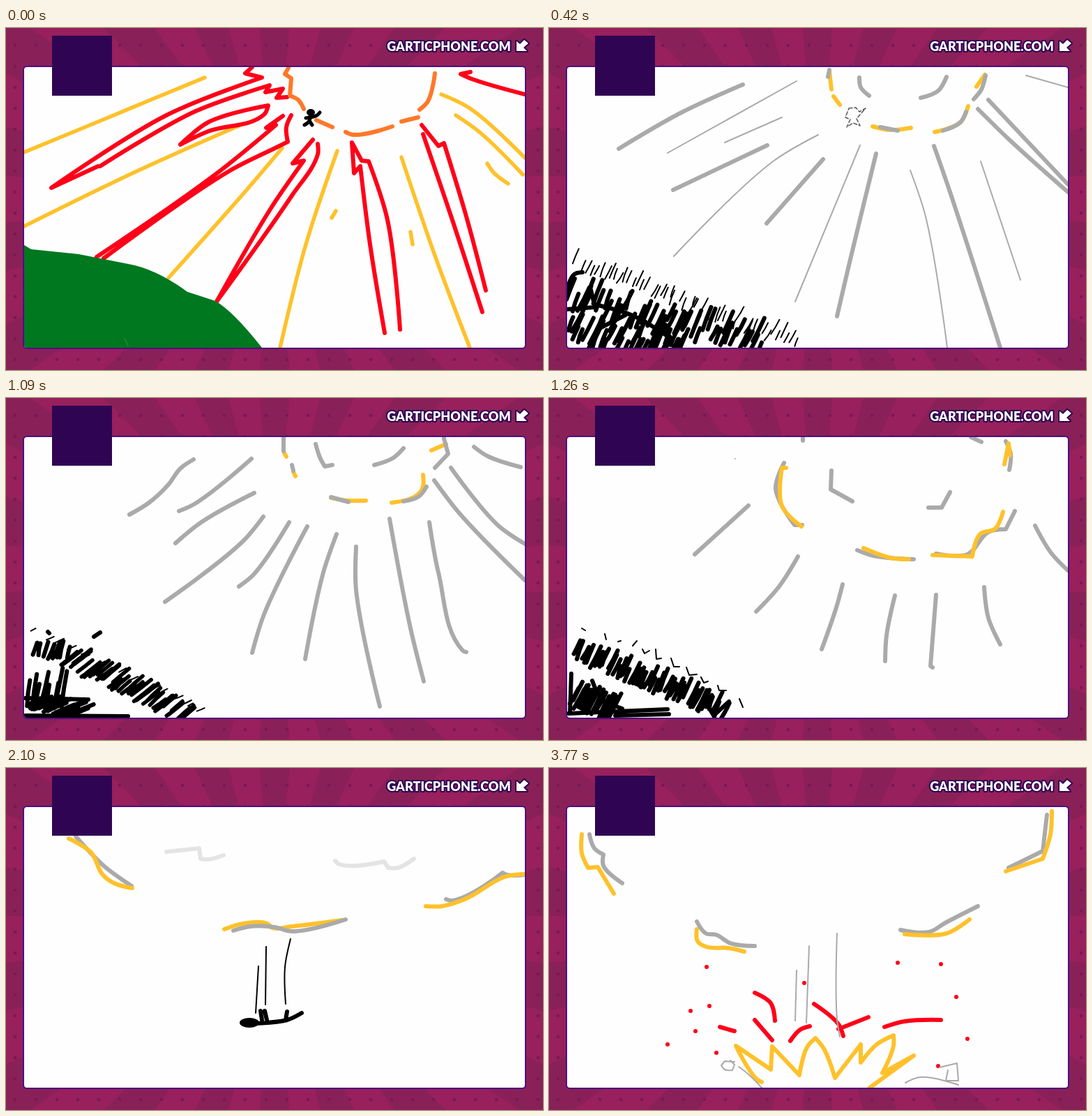
These frames come from a looping animation (770 by 490 pixels, 4.6 s). An HTML page:

```html
<!DOCTYPE html>
<html lang="en">
<meta charset="utf-8">
<title>Falling from the sun</title>
<style>
  html, body { margin: 0; width: 100%; height: 100%; overflow: hidden; }
  body {
    background:
      radial-gradient(circle, #751b52 2px, transparent 2.6px) -2px 10px / 30px 30px,
      repeating-conic-gradient(from 5deg at 385px 245px, #98205c 0 10deg, #8a2058 10deg 20deg);
  }
  svg { display: block; }
  path { fill: none; stroke-linecap: round; stroke-linejoin: round; }
  text { font: 900 18px Lato, sans-serif; }
  .label { fill: #fff; stroke: #2c0350; stroke-width: 4; stroke-linejoin: round; paint-order: stroke; }
</style>
<svg width="770" height="490" viewBox="0 0 770 490">
  <clipPath id="inside"><rect x="26" y="56" width="718" height="402" rx="4"/></clipPath>
  <rect x="25" y="55" width="720" height="404" rx="5" fill="#fefefe" stroke="#4b1080" stroke-width="2"/>
  <g id="stage" clip-path="url(#inside)"></g>
  <rect x="66" y="11" width="86" height="86" fill="#2f0553"/>
  <g class="label">
    <text x="635" y="33" text-anchor="middle">GARTICPHONE.COM</text>
    <path style="fill:#fff" d="M732 33V19l5 4 6-6 6 5-7 6 5 5Z"/>
  </g>
</svg>
<script>
const GRAY = '#aaa', YELLOW = '#ffc12b', RED = '#ff0019', ORANGE = '#ff7829', BLACK = '#000';
const STEP = 420, LOOP = 4600;
const stage = document.getElementById('stage');
const scenes = [];

const scene = () => scenes.push('');
const add = shape => { scenes[scenes.length - 1] += shape; };

// Smooth curve through the points; sharp turns stay corners.
function curve(p) {
  const sub = (a, b) => [a[0] - b[0], a[1] - b[1]];
  const tangent = p.map((q, i) => {
    const a = sub(q, p[i - 1] || q), b = sub(p[i + 1] || q, q);
    const la = Math.hypot(...a), lb = Math.hypot(...b);
    if (!la || !lb || (a[0] * b[0] + a[1] * b[1]) / la / lb < 0.6) return [0, 0];
    const t = [a[0] / la + b[0] / lb, a[1] / la + b[1] / lb], l = Math.hypot(...t);
    return [t[0] / l, t[1] / l];
  });
  let d = 'M' + p[0];
  for (let i = 1; i < p.length; i++) {
    const k = Math.hypot(...sub(p[i], p[i - 1])) / 3, s = tangent[i - 1], e = tangent[i];
    d += `C${p[i - 1][0] + s[0] * k} ${p[i - 1][1] + s[1] * k} ${p[i][0] - e[0] * k} ${p[i][1] - e[1] * k} ${p[i]}`;
  }
  return d;
}

// Strokes are separated by commas; a single point makes a dot.
function pen(color, width, strokes, extra = '') {
  const d = strokes.split(',').map(s => {
    const n = s.trim().split(/\s+/).map(Number), p = [];
    for (let i = 0; i < n.length; i += 2) p.push([n[i], n[i + 1]]);
    return p.length > 1 ? curve(p) : `M${p[0]}h.01`;
  }).join('');
  add(`<path stroke="${color}" stroke-width="${width}" d="${d}" ${extra}/>`);
}

const blob = (x, y, rx, ry) => add(`<ellipse cx="${x}" cy="${y}" rx="${rx}" ry="${ry}"/>`);

let seed = 7;
const rand = (a, b) => {
  seed = seed * 16807 % 2147483647;
  return a + (b - a) * seed / 2147483647;
};

// Scribbled blades along a line, spread downwards by depth.
function grass(count, width, [x1, y1, x2, y2], depth, [dx, dy]) {
  let d = '';
  for (let i = 0; i < count; i++) {
    const u = (i + rand(0, 1)) / count, k = rand(0.6, 1.15), bend = rand(-3, 3);
    const x = x1 + (x2 - x1) * u, y = y1 + (y2 - y1) * u + rand(0, depth);
    d += `M${x} ${y}q${dx * k / 2 + bend} ${dy * k / 2} ${dx * k + bend} ${dy * k}`;
  }
  add(`<path stroke="${BLACK}" stroke-width="${width}" d="${d}"/>`);
}

// Close to the sun
scene();
pen(YELLOW, 5.5, `26 178 152 126 200 106 285 71, 26 284 190 204 341 137, 233 358 345 232 396 172,
  393 458 430 310 475 176, 567 185 615 326 665 458`);
pen(YELLOW, 5.5, '624 95 665 115 744 186, 645 125 680 150 741 210, 690 194 700 208 720 223, 473 262 467 272, 580 292 583 310');
pen(RED, 6, `353 56 343 65 367 71 230 125 65 229 132 198, 135 198 270 120 378 82 372 92 397 87 388 100 403 99,
  250 167 290 135 376 111 370 124 290 148 250 167`);
pen(RED, 6, `130 328 300 210 387 139 373 143 397 126, 140 330 320 205 390 170 404 163 402 142 409 125,
  302 392 380 258 427 190 411 194 440 160, 302 392 410 240 447 181 447 166`);
pen(RED, 6, `543 437 522 310 508 198 499 208 496 164 510 190 520 191 547 275 565 432,
  683 407 640 275 598 152, 596 139 620 169 628 165 660 270 688 376, 744 95 668 73 652 66 666 63`);
pen(ORANGE, 6, '405 57 400 66 409 72 407 97 419 103 427 116, 445 132 468 142, 487 149 498 153 554 141, 567 134 591 128, 593 117 605 105 615 65');
pen(BLACK, 5, '430 129 446 125 450 121, 436 122 435 133 428 139, 435 133 439 139');
blob(437, 121, 6, 5);
add('<path style="fill:#007820" d="M26 311 36 317 104 324 175 338Q215 345 260 378L300 391Q325 405 367 458H26Z"/>');
pen('#3c9450', 1, '170 445 175 455');

// First look back
scene();
pen(YELLOW, 6, '402 62 405 88, 408 98 417 110, 464 141 490 146 519 143, 553 149 590 135 601 112, 613 84 625 67');
pen(GRAY, 6, `278 81 190 121 100 173, 313 168 178 232, 393 188 312 280, 469 180 430 340 413 413,
  552 169 575 235 647 458, 615 116 660 160 744 235, 630 103 744 224`);
pen(GRAY, 6, '445 71 447 85 459 97, 570 70 558 90 533 100, 402 60 400 70, 475 142 500 147, 565 147 590 135 598 120, 626 68 620 88 609 102');
pen(GRAY, 2, `355 76 170 179, 334 128 252 164, 386 153 320 192 179 327, 446 168 353 392,
  518 204 540 270 571 458, 619 191 676 361, 684 68 744 85`);
pen('#555', 1.5, '430 115 440 114 445 120 454 115 441 130 446 140 436 136 427 142 432 131 425 128 430 115', 'stroke-dasharray="5 3"');
grass(48, 2, [34, 334, 354, 448], 16, [9, -19]);
grass(46, 6, [24, 382, 300, 445], 28, [13, -30]);
grass(38, 6, [24, 422, 190, 452], 40, [14, -30]);
pen(BLACK, 6, '26 403 66 400, 60 375 65 396 120 412 175 445, 73 430 110 411, 26 375 36 353 48 350');

// Further down
scene();
pen(YELLOW, 6, '399 79 402 84, 412 106 415 112, 466 143 490 147 516 147, 553 150 585 142 597 130 598 110, 610 75 631 66');
pen(GRAY, 6, `269 88 250 101 232 125 205 150 177 167, 352 87 270 152 248 162, 356 136 280 178 243 208,
  369 170 340 205 228 292, 406 178 355 253 334 270, 432 184 370 310 353 365`);
pen(GRAY, 6, `474 195 455 250 429 374, 502 213 502 275 536 442, 550 173 580 330 599 406, 607 178 620 250 655 362 660 364,
  614 118 650 165 744 261, 638 100 705 182 744 209, 671 70 690 83 738 99`);
pen(GRAY, 6, `444 66 450 85 457 98 468 96, 570 72 555 86 528 96, 398 57 398 76, 410 96 412 104,
  466 142 491 149, 570 148 592 141 603 127, 628 58 634 80 615 100`);
grass(17, 2, [34, 332, 288, 452], 4, [10, -5]);
grass(8, 6, [38, 365, 90, 372], 6, [7, -22]);
grass(42, 5.5, [76, 370, 254, 455], 14, [24, -20]);
grass(9, 6, [28, 440, 80, 440], 6, [10, -52]);
grass(22, 6, [30, 435, 90, 450], 10, [34, -14]);
pen(BLACK, 6, '28 430 118 432, 28 455 175 456, 60 335 62 337, 126 342 135 336');

// Sun opens up
scene();
pen(GRAY, 6, `286 154 209 224, 357 227 330 270 297 306, 421 267 412 300 391 360, 496 283 484 340 482 377,
  555 282 547 384 550 386, 624 271 630 315 647 353, 697 183 720 222 744 247`);
pen(GRAY, 6, `364 56 364 61, 605 56 620 63, 405 104 404 131 435 148, 575 135 563 157 544 157, 337 93 325 130 352 182 363 182,
  442 218 465 226 523 231, 555 223 600 224 630 192 655 188 668 162, 655 62 662 80 660 103`);
pen(YELLOW, 6, '340 100 334 100 334 155 362 184, 451 215 490 229 516 231, 550 225 607 227 618 195 640 187 651 163, 653 95 659 65 661 82');
pen(GRAY, 2, '267 87');
pen(BLACK, 2, `47 330 52 333, 80 338 82 346, 99 349 103 348, 120 355 126 348, 134 360 137 366 144 362, 153 360 154 374 161 373,
  175 373 179 385 187 385, 197 386 201 397 212 396, 218 400 222 408 228 406, 242 412 244 419 254 419, 273 431 278 443`);
grass(46, 6, [34, 365, 246, 450], 12, [12, -27]);
grass(25, 6, [28, 430, 85, 452], 14, [16, -32]);
pen(BLACK, 6, '32 395 30 452, 62 405 75 430 105 445, 28 452 170 446, 95 455 172 453, 225 436 236 455 258 435');

// Falling
scene();
pen(YELLOW, 6, `96 102 127 130 136 152 150 166 183 167, 322 235 335 226 375 235 408 231,
  576 242 588 238 590 222 610 222 659 198, 714 87 706 130 689 142`);
pen(GRAY, 6, `97 110 105 127 120 132 126 148 161 168, 270 126 283 128 289 121 310 125 332 126, 335 234 355 227 375 239 417 238,
  444 216 470 218 495 229 527 229, 529 142 548 152 565 144 592 137, 583 232 608 213 630 216 666 205, 733 94 726 104 712 106 708 128 694 140`);
pen(BLACK, 6, `360 245 363 278, 378 244 381 278, 398 245 395 281,
  350 304 390 316 410 312, 362 308 378 301, 376 315 389 313, 400 321 417 324`);
blob(347, 303, 9, 7.5);

// Almost at the ground
scene();
pen('#e4e4e4', 6, '230 120 277 115 279 130 290 131 312 125, 472 133 478 138 542 134 548 143 562 143 585 130');
pen(GRAY, 6, '100 98 140 140 180 169, 631 188 640 190 712 150 718 153 744 153');
pen(YELLOW, 6, `90 101 122 121 138 152 155 165 181 172, 313 231 340 223 375 223 382 229 410 227 482 218,
  602 198 625 198 660 187 715 156 744 152`);
pen(GRAY, 6, '326 233 350 227 385 228 410 234 487 217');
pen(BLACK, 2, '362 284 358 351, 373 256 372 339, 408 245 400 285 401 338');
pen(BLACK, 6, '345 366 403 361 424 351, 367 361 365 348, 374 361 371 348, 401 361 403 349');
blob(349, 365, 14, 7);

// Impact
scene();
pen(GRAY, 6, `58 95 65 115 78 124 78 140 105 165, 212 220 225 237 240 239 260 251 295 255,
  504 232 545 235 568 222 615 198, 714 67 708 119 659 143`);
pen(YELLOW, 6, `47 95 47 122 56 143 70 142 93 180, 212 231 213 248 225 256 258 258 280 263,
  510 238 570 237 603 217, 721 62 719 95 708 130 655 148`);
pen(YELLOW, 6, `305 450 298 446 268 398 318 432 320 399 359 440 370 400 382 387 394 402 410 444 447 396 447 422
  470 396 494 383 494 398 478 437 523 412 460 458`);
pen(RED, 6, `295 322 318 337 324 362, 295 361 320 390, 346 391 360 375 374 370, 380 338 415 367 422 384,
  415 374 458 357, 481 371 510 363 562 361, 245 371 266 377`);
pen(RED, 6, '226 285, 230 341, 203 348, 210 377, 170 396, 240 408, 366 308, 500 279, 562 281, 584 328, 600 388, 558 427');
pen(GRAY, 2, `355 290 353 362, 373 255 369 365, 413 237 413 360 417 385, 266 421 252 420 247 426 252 432 263 433 266 425 260 419,
  272 428 285 438 305 458, 511 451 532 443 587 454, 560 429 585 423 587 448 569 448 572 433`);

stage.innerHTML = scenes.map(s => `<g>${s}</g>`).join('');
const start = performance.now();

function tick() {
  const time = (performance.now() - start) % LOOP;
  const current = Math.min(Math.floor(time / STEP), scenes.length - 1);
  [...stage.children].forEach((g, i) => { g.style.display = i === current ? '' : 'none'; });
  requestAnimationFrame(tick);
}
tick();
</script>
</html>
```
